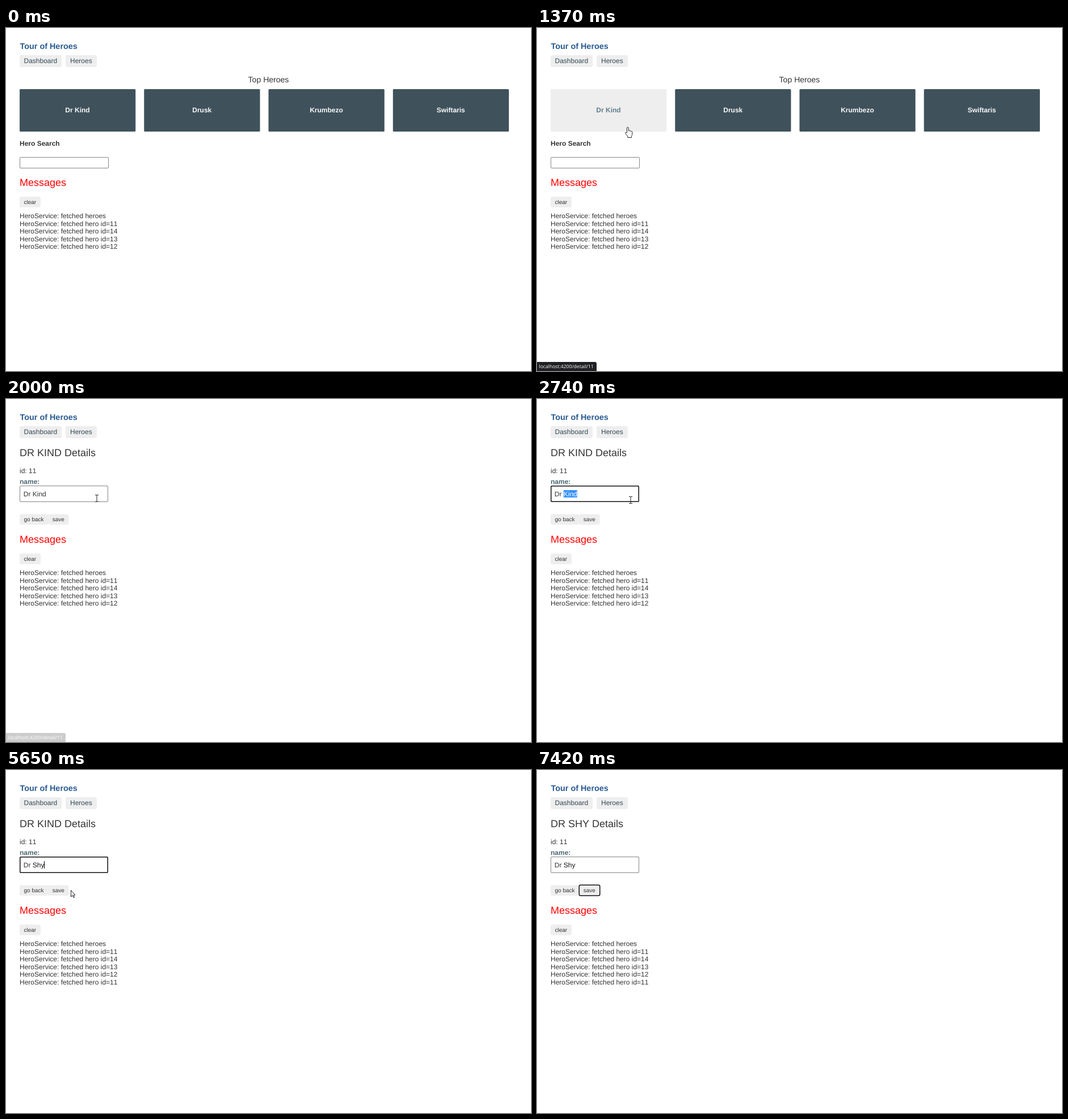
An HTML page that plays this animation: 925 by 606 pixels, repeating every 8000 ms.

```html
<!DOCTYPE html>
<html lang="en">
<head>
<meta charset="utf-8">
<title>Tour of Heroes</title>
<style>
  html, body { margin: 0; height: 100%; overflow: hidden; background: #fff; }
  svg { display: block; width: 925px; height: 606px; }
  text {
    font: 12px "Liberation Sans", Arial, sans-serif; font-kerning: none;
    text-rendering: geometricPrecision; fill: #333; white-space: pre;
  }
  .b { font-weight: bold; }
  .h1 { font-size: 14.4px; font-weight: bold; font-kerning: normal; fill: #2a5b91; }
  .h2 { font-size: 18px; }
  .h3 { font-size: 14.04px; font-kerning: normal; }
  .small { font-size: 10px; }
  .mid { text-anchor: middle; }
  .nav { fill: #334953; }
  .label { font-weight: bold; fill: #4d6873; }
  .card { fill: #3f525c; }
  .cardName { font-weight: bold; fill: #f8f8f8; }
  .btn { fill: #eee; }
  .field { fill: #fff; stroke: #858585; }
  .focus { fill: none; stroke: #101010; stroke-width: 1.5; }
  .typed { fill: #111; }
  .status { font: 8.6px "Open Sans", sans-serif; fill: #fff; }
  .cursor { fill: #fff; stroke: #222; stroke-linejoin: round; }
</style>
</head>
<body>
<svg viewBox="0 0 925 606">
  <text class="h1" x="24.5" y="37">Tour of Heroes</text>
  <rect class="btn" x="24" y="48" width="74" height="21" rx="3"/>
  <text class="nav" x="31.5" y="62">Dashboard</text>
  <rect class="btn" x="105" y="48" width="55" height="21" rx="3"/>
  <text class="nav" x="113" y="62">Heroes</text>

  <g id="dashboard">
    <text class="h3 mid" x="462.5" y="96">Top Heroes</text>
    <g id="cards"></g>
    <text class="b" x="24" y="208">Hero Search</text>
    <rect class="field" x="24.5" y="228.5" width="156" height="19" rx="1.5"/>
  </g>

  <g id="detail">
    <text class="h2" id="heading" x="24" y="101"></text>
    <text x="24" y="131">id: 11</text>
    <text class="label" x="24" y="150">name:</text>
    <rect class="field" x="24.5" y="153.5" width="155" height="28" rx="1.5"/>
    <rect class="focus" id="fieldFocus" x="24.75" y="153.75" width="154.5" height="27.5" rx="1.5"/>
    <rect id="selection" x="46.75" y="161" width="24" height="13" fill="#3390ff"/>
    <text x="30.75" y="172">Dr </text>
    <text id="name" x="46.75" y="172"></text>
    <rect id="caret" y="161" width="1" height="13"/>
    <rect class="btn" x="24" y="203.5" width="50" height="18.5" rx="3"/>
    <text class="small" x="31.5" y="216">go back</text>
    <rect class="btn" id="save" x="74" y="203.5" width="36.5" height="18.5" rx="3"/>
    <rect class="focus" id="saveFocus" x="74.25" y="203.25" width="36.5" height="18.75" rx="2.5"/>
    <text class="small" x="81.7" y="216">save</text>
  </g>

  <g id="messages">
    <text class="h2" x="24" y="279" style="fill:red">Messages</text>
    <rect class="btn" x="24" y="298" width="37" height="19" rx="3"/>
    <text class="small" x="31.5" y="311">clear</text>
  </g>

  <g id="status">
    <path d="M0 590H102q3 0 3 3V606H0z" fill="#202124"/>
    <text class="status" x="3.5" y="601">localhost:4200/detail/11</text>
  </g>

  <g id="cursor" class="cursor">
    <path id="arrow" d="M.5.5V12l2.7-2.5 1.8 4.1 1.7-.8-1.8-3.9H8z"/>
    <path id="hand" d="M-1.5 9.5V1.7a1.4 1.4 0 0 1 2.8 0V6.8c.3-1 2.4-.9 2.5.4 .4-.9 2.1-.6 2.2.6 .5-.7 1.8-.4 1.8 1V12c0 2-.9 3-1.4 4.2V18.5H-.2V16.6C-1.5 14.5-3.6 12.2-4.4 10.6c-.6-1.3 1.2-2.3 2.9-.2z"/>
    <path id="beam" fill="none" d="M-3-5.5h2q1 0 1 1 0-1 1-1h2M0-4.5v10M-3 6.5h2q1 0 1-1 0 1 1 1h2"/>
  </g>
</svg>
<script>
const LOOP = 8000;
const $ = id => document.getElementById(id);
const show = (id, on) => $(id).style.display = on ? '' : 'none';
const within = (t, from, to) => t >= from && t < to;
const clamp = v => Math.min(1, Math.max(0, v));

$('cards').innerHTML = ['Dr Kind', 'Drusk', 'Krumbezo', 'Swiftaris'].map((name, i) => {
  const x = 24 + 219.25 * i;
  return `<rect class="card" x="${x}" y="108" width="204.25" height="75" rx="1.5"/>
    <text class="cardName mid" x="${x + 102}" y="149">${name}</text>`;
}).join('');

['es', ' id=11', ' id=14', ' id=13', ' id=12', ' id=11'].forEach((end, i) => {
  const y = Math.round(336 + 13.6 * i);
  $('messages').insertAdjacentHTML('beforeend',
    `<text id="line${i}" x="24" y="${y}">HeroService: fetched hero${end}</text>`);
});

// Pointer keys: time, x, y
const path = [
  [80, 822, 600], [880, 170, 209], [920, 168, 206], [1020, 159, 183], [1300, 160, 175],
  [2739, 160, 175], [2740, 165, 178], [5000, 165, 178], [5150, 177, 203], [5380, 152, 226],
  [5650, 114, 212], [5720, 113, 213], [5870, 113, 213], [6120, 97, 209], [6640, 97, 209],
  [7420, 892, 606]
];

function pointer(t) {
  const i = Math.max(1, path.findIndex(key => key[0] > t));
  const [t0, x0, y0] = path[i - 1], [t1, x1, y1] = path[i];
  const u = clamp((t - t0) / (t1 - t0)), e = u * u * (3 - 2 * u);
  return [x0 + (x1 - x0) * e, y0 + (y1 - y0) * e];
}

function shape(t) {
  if (within(t, 1000, 1500) || within(t, 5960, 6710)) return 'hand';
  return within(t, 1500, 5060) ? 'beam' : 'arrow';
}

const card = $('cards').querySelector('rect'), cardName = $('cards').querySelector('text');
const keyTimes = [3690, 4050, 4510];

function draw(t) {
  const onDetail = t >= 1450, saved = t >= 6320;
  show('dashboard', !onDetail);
  show('detail', onDetail);
  $('messages').setAttribute('transform', `translate(0 ${onDetail ? -25 : 0})`);
  show('line5', t >= 3530);

  const hover = within(t, 1050, 1450);
  card.style.fill = hover ? '#eee' : '';
  cardName.style.fill = hover ? '#607d8b' : '';
  $('status').style.opacity = t < 1900 ? clamp((t - 1080) / 100) : clamp((2030 - t) / 130);

  $('heading').textContent = `DR ${saved ? 'SHY' : 'KIND'} Details`;
  const typed = keyTimes.filter(k => t >= k).length;
  const selected = within(t, 2250, keyTimes[0]);
  $('name').textContent = typed ? 'Shy'.slice(0, typed) : 'Kind';
  $('name').setAttribute('class', typed ? 'typed' : '');
  $('name').style.fill = selected ? '#fff' : '';
  show('selection', selected);
  show('fieldFocus', within(t, 2110, 6320));

  const blinkOn = typed && Math.floor((t - keyTimes[typed - 1]) / 500) % 2 === 0;
  show('caret', blinkOn && !saved);
  if (blinkOn) $('caret').setAttribute('x', Math.round(46.75 + $('name').getComputedTextLength()));

  $('save').style.fill = within(t, 5960, 6710) ? '#cfd8dc' : '';
  show('saveFocus', saved);

  show('cursor', within(t, 80, 7420));
  const [x, y] = pointer(Math.min(t, 7419));
  $('cursor').setAttribute('transform', `translate(${Math.round(x)} ${Math.round(y)})`);
  for (const id of ['arrow', 'hand', 'beam']) show(id, id === shape(t));
}

const start = performance.now();
function tick() {
  draw((performance.now() - start) % LOOP);
  requestAnimationFrame(tick);
}
tick();
</script>
</body>
</html>
```
